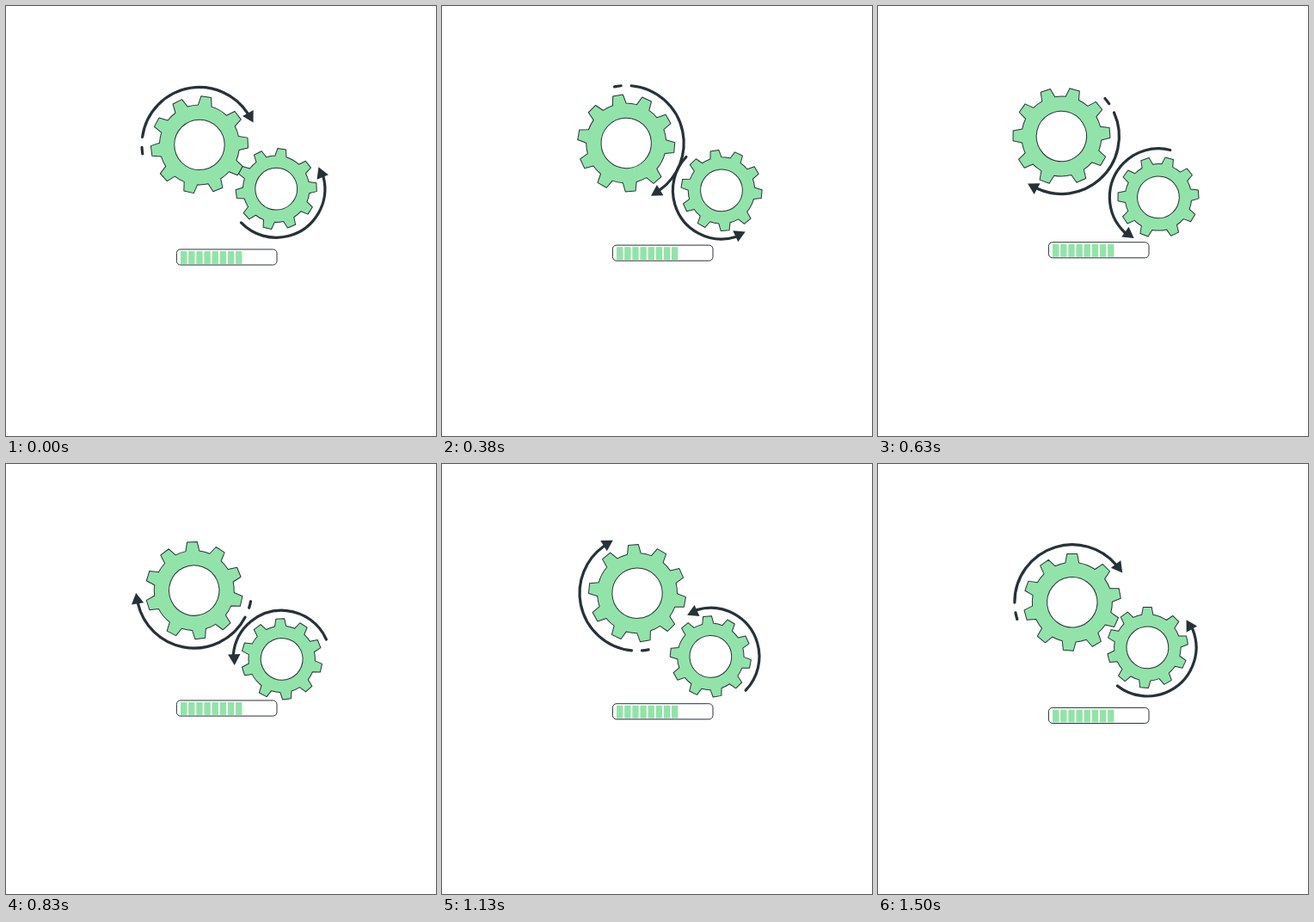
These frames come from a looping animation (500x500 px, 1.54 s). An HTML page:

```html
<!DOCTYPE html>
<html lang="en">
<head>
<meta charset="utf-8">
<title>Loading gears</title>
<style>
  html, body { margin: 0; width: 100%; height: 100%; overflow: hidden; background: #fff; }
  svg { display: block; width: 100%; height: 100%; }
  .line { stroke: #263238; stroke-linejoin: round; }
  .green { fill: #92e3a9; }
  .white { fill: #fff; }
  .arrow { fill: none; stroke: #263238; stroke-width: 3.2; stroke-linecap: round; }
  .head { fill: #263238; }
</style>
</head>
<body>
<svg viewBox="0 0 500 500">
  <g id="bar">
    <rect class="line white" x="198.4" y="0" width="116.6" height="18.1" rx="4.5"/>
  </g>
  <g id="big">
    <g transform="translate(225 161.4)">
      <path class="line green"/>
      <circle class="line white" r="29.2"/>
      <circle class="arrow" r="67" pathLength="360" stroke-dasharray="6.7 10.2 139 360" transform="rotate(170.7)"/>
      <path class="head" d="M-7.2 0H7.2L0 12.6Z" transform="rotate(-33.4) translate(67.4) rotate(4)"/>
    </g>
  </g>
  <g id="small">
    <g transform="translate(314.2 212.7)">
      <path class="line green"/>
      <circle class="line white" r="24.4"/>
      <circle class="arrow" r="56.6" pathLength="360" stroke-dasharray="150.4 360" transform="rotate(-14.5)"/>
      <path class="head" d="M-7.2 0H7.2L0 12.6Z" transform="rotate(-14.5) translate(55.7) rotate(172)"/>
    </g>
  </g>
</svg>
<script>
const LOOP = 1540;
// Rotation over time as [ms, degrees]; the spin is slightly uneven.
const SPIN = [[0, 0], [250, 59.3], [380, 87.3], [630, 148], [830, 200], [1130, 267.8], [1500, 352], [LOOP, 360]];
const $ = selector => document.querySelector(selector);
const bar = $('#bar'), big = $('#big'), small = $('#small');

// Ten teeth, with one wider gap between the last and the first.
function gearPath(scale) {
  const root = 46.5 * scale, tip = 56.6 * scale;
  const point = (radius, degrees) => {
    const a = degrees * Math.PI / 180;
    return `${radius * Math.cos(a)} ${radius * Math.sin(a)}`;
  };
  let d = '';
  for (let i = 0; i < 10; i++) {
    const a = -37.7 + 35.04 * i;
    d += (i ? `A${root} ${root} 0 0 1 ` : 'M') + point(root, a - 9.8);
    d += `L${point(tip, a - 6)}L${point(tip, a + 6)}L${point(root, a + 9.8)}`;
  }
  return d + `A${root} ${root} 0 0 1 ${point(root, -47.5)}Z`;
}

function spinAt(t) {
  const i = SPIN.findIndex(([time]) => time > t);
  const [t0, a0] = SPIN[i - 1], [t1, a1] = SPIN[i];
  return a0 + (a1 - a0) * (t - t0) / (t1 - t0);
}

function draw(now) {
  const angle = spinAt(now % LOOP);
  big.setAttribute('transform', `rotate(${angle} 220.6 154.8)`);
  small.setAttribute('transform', `rotate(${angle} 318.7 219.2)`);
  const fromTop = Math.abs((angle + 7.7) % 360 - 180);
  bar.setAttribute('transform', `translate(0 ${273.4 + fromTop / 18})`);
}

big.querySelector('.green').setAttribute('d', gearPath(1));
small.querySelector('.green').setAttribute('d', gearPath(0.833));
for (let i = 0; i < 8; i++) {
  bar.insertAdjacentHTML('beforeend', `<rect class="green" x="${203 + 9.14 * i}" y="2.1" width="7.4" height="14.8"/>`);
}

const start = performance.now();
function tick() {
  draw(performance.now() - start);
  requestAnimationFrame(tick);
}
tick();
</script>
</body>
</html>
```
